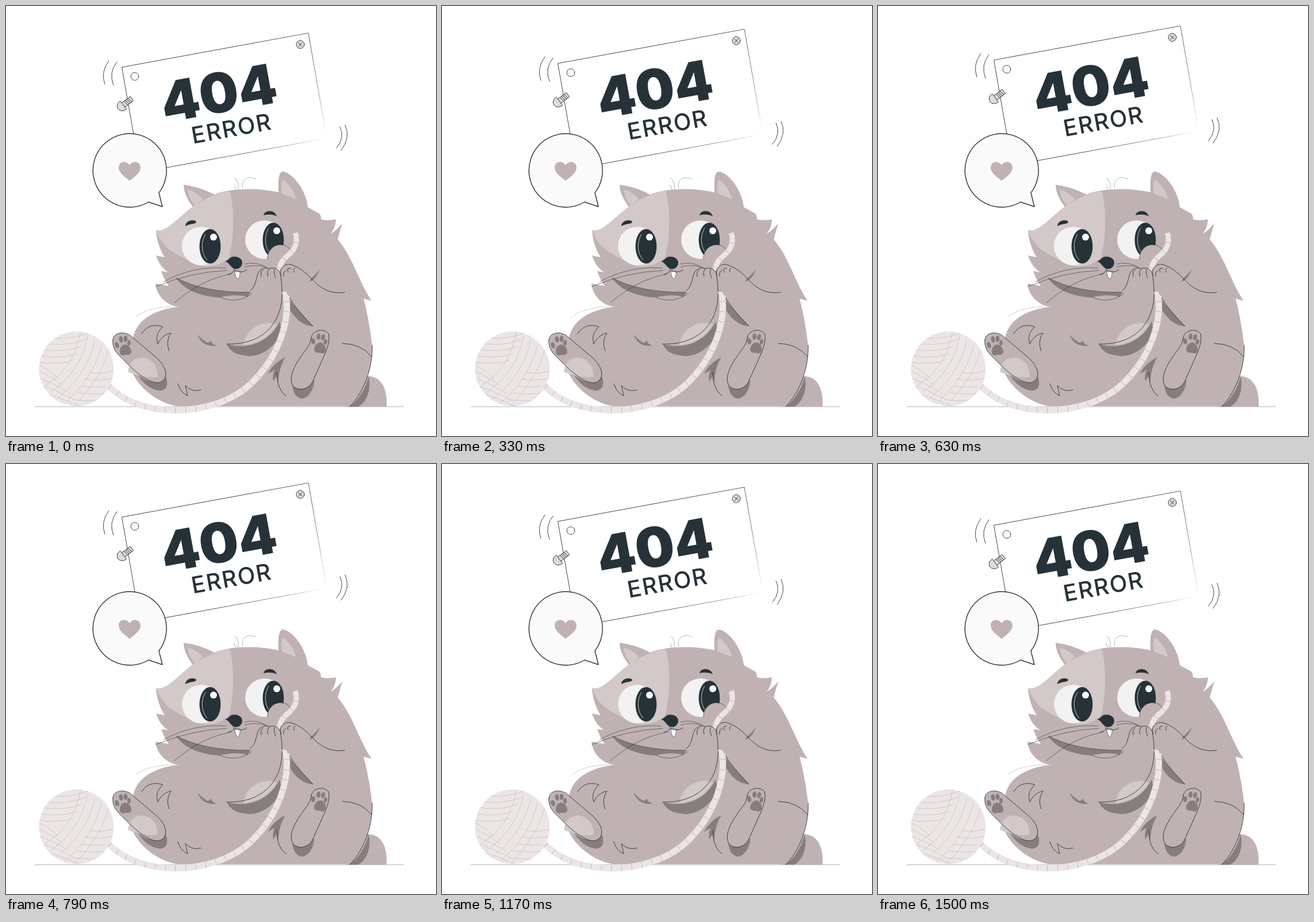
Write an HTML page that moves like this. It is 748x748 px and loops after 1.54 s.

```html
<!DOCTYPE html>
<html lang="en">
<head>
<meta charset="utf-8">
<title>404 error</title>
<style>
  html, body { margin: 0; height: 100%; overflow: hidden; background: #fff; }
  svg { display: block; width: 100vw; height: 100vh; }
  .fur { fill: #c0b2b3; }
  .light { fill: #d2c9c8; }
  .shade { fill: #867d7d; }
  .ink { fill: #263238; }
  .line { fill: none; stroke: #263238; stroke-width: .9; stroke-linecap: round; stroke-linejoin: round; }
  .thin { stroke-width: .6; }
  .yarn { fill: none; stroke: #ebe6e5; stroke-width: 11; }
  .ticks { fill: none; stroke: #b9afaf; stroke-width: 10; stroke-dasharray: .8 17; }
  .strand { fill: none; stroke: #cbc2c2; stroke-width: .9; }
  text { font-family: Inter, sans-serif; text-anchor: middle; fill: #263238; }
</style>
</head>
<body>
<svg viewBox="0 0 748 748">
  <defs>
    <radialGradient id="fade" gradientUnits="userSpaceOnUse" cx="558" cy="230" r="230">
      <stop offset=".02" stop-color="#263238" stop-opacity="0"/>
      <stop offset=".35" stop-color="#263238" stop-opacity=".55"/>
      <stop offset="1" stop-color="#263238"/>
    </radialGradient>
    <clipPath id="ballClip"><circle cx="122.5" cy="631" r="65"/></clipPath>
    <clipPath id="footClip"><path id="footL" d="M186 581C187 567 206 566 216 573L262 612C281 629 283 650 267 655C250 658 229 641 195 606C188 598 185 590 186 581Z"/></clipPath>
  </defs>

  <g id="sign">
    <path d="M201.5 106.5L526 47L558 230L233.5 289.5Z" fill="#fff" stroke="url(#fade)" stroke-width=".9"/>
    <text transform="translate(376 185) rotate(-10.3)" font-size="96" font-weight="900">404</text>
    <text transform="translate(395 227) rotate(-10.3)" font-size="40" font-weight="500" letter-spacing="1.8">ERROR</text>
    <circle class="line" cx="224" cy="122.5" r="6.8"/>
    <circle class="line" cx="512" cy="67" r="7" style="fill:#dcdcdc"/>
    <path class="line" d="M508.5 64L515.5 70M515 63.5L509 70.5"/>
    <g class="line" transform="translate(203 173) rotate(-37)" style="fill:#dcdcdc">
      <path d="M0-4.5H20V4.5H0ZM6-4.5L7.5 4.5M9-4.5L10.5 4.5M12-4.5L13.5 4.5M15-4.5L16.5 4.5"/>
      <path d="M1-9C-7-9-10-4-10 0S-7 9 1 9Z"/>
    </g>
    <path class="line" d="M179 95Q164 115 172 136M193 97Q178 116 187 138M581 210Q590 229 575 247M590 207Q600 229 583 251"/>
  </g>

  <path class="line" d="M248 341A64 64 0 1 1 266 325L272 349Z" style="fill:#fafafa;stroke-width:1.4"/>
  <path class="fur" d="M215 304C208 298 196 291 196 281C196 270 210 268 215 277C220 268 234 270 234 281C234 291 222 298 215 304Z"/>

  <path class="line thin" d="M50 697H692" opacity=".65"/>

  <!-- tail and body -->
  <path class="fur" d="M590 697H662C664 668 654 643 628 644Z"/>
  <path class="shade" d="M597 697C614 686 626 664 631 644C636 668 627 689 613 697Z"/>
  <path class="fur" d="M300 523C255 529 222 548 220 586L217 630C227 662 262 690 297 696H598C619 675 639 630 637 592C634 565 629 535 622 509L636 513C613 478 604 438 577 406L585 378Q574 391 565 396Q574 384 574 371Q559 374 548 371Q548 364 545 361L525 350L330 400Z"/>
  <path class="line" d="M637 590C638 635 620 674 598 697M585 587Q617 587 636 610"/>
  <path class="line thin" d="M226 541C240 528 265 524 290 523" opacity=".4"/>

  <!-- head -->
  <path class="fur" d="M261 390C278 394 292 375 325 349C316 338 309 324 309 311C328 313 348 320 362 328C390 316 440 316 474 324C473 305 474 289 481 288C498 289 522 320 525 350C560 400 550 450 500 470L430 499C410 517 388 514 372 507L297 523C280 520 262 505 260 483L283 487C277 479 273 470 270 461L282 463C273 457 266 449 261 434L276 437C268 425 262 408 261 390Z"/>
  <path class="light" d="M261 390C278 394 292 375 325 349Q355 328 389 321C398 355 397 402 388 438C370 454 348 457 325 448C300 430 276 430 261 390Z"/>
  <path class="light" d="M316 319C317 330 323 342 329 347L342 336C335 327 325 321 316 319ZM481 302C478 315 479 324 481 327Q494 331 505 336C501 322 492 308 481 302Z"/>
  <path class="line thin" d="M398 299Q406 306 404 318M435 301C418 293 408 305 412 317M397 311Q399 315 399 319" opacity=".6"/>
  <path class="shade" d="M296 473Q345 499 425 498L420 506Q400 500 372 507C342 506 310 495 296 473Z"/>
  <path class="line thin" d="M296 473Q345 499 425 498M372 507Q405 520 432 497"/>

  <!-- eyes -->
  <g id="eyes">
    <ellipse cx="340" cy="417.500" rx="34" ry="33.500" fill="#f2f2f2"/>
    <g class="ink"><ellipse cx="355" cy="418" rx="18.500" ry="30"/></g>
    <path d="M347 397C339 410 339 430 350 442" fill="none" stroke="#eee" stroke-width=".8"/>
    <circle cx="361" cy="402" r="6" fill="#fff"/>
  </g>
  <use href="#eyes" x="110" y="-11"/>
  <path class="ink" d="M312 383C312 374 325 370 331 375C331 380 320 378 312 383ZM448 364C450 354 468 354 471 366C465 362 455 362 448 364Z"/>

  <!-- muzzle -->
  <path class="ink" d="M381 444C388 443 388 436 397 436C405 436 411 440 411 447C410 456 402 459 397 457C391 455 388 446 381 444Z"/>
  <path class="line thin" d="M398 462Q399 472 403 475Q408 472 407 461Z" style="fill:#fff"/>
  <path class="line" d="M397 457Q398 464 386 467M398 460Q410 466 419 459"/>
  <path class="line thin" d="M382 456C340 452 300 465 274 480M384 460Q320 463 261 488M392 466C350 475 325 490 293 516M415 449Q436 443 455 456M415 454Q433 449 451 454"/>

  <!-- yarn ball -->
  <circle cx="122.500" cy="631" r="65" fill="#ebe6e5"/>
  <g id="strands" class="strand" clip-path="url(#ballClip)"></g>

  <!-- belly details -->
  <path class="line" d="M236 570C245 556 258 553 273 558C262 568 261 578 264 588C270 575 280 570 287 569C280 580 280 590 284 600M299 657C302 668 308 674 316 678C314 669 313 664 312 660C318 667 327 671 339 668"/>
  <path class="shade" d="M333 571C338 586 350 593 366 591Q358 588 356 582Q354 585 351 586C343 582 338 577 333 571Z"/>
  <path class="shade" d="M546 457C542 471 532 482 521 480C531 475 540 467 546 457Z"/>
  <path class="shade" d="M486 611C470 619 461 629 456 640L467 633Q463 643 465 653L472 642Q471 649 474 655C474 638 478 624 486 611Z"/>
  <path class="line" d="M471 637C471 657 477 671 487 678"/>

  <!-- arms -->
  <path class="shade" d="M384 588C415 597 455 590 476 549L480 568C463 600 440 609 422 609C402 607 390 602 384 588Z"/>
  <path class="fur" d="M400 535L480 490Q483 545 451 574Q420 592 384 588Z"/>
  <path class="light" d="M413 590C416 563 444 544 471 554C461 574 440 587 413 590Z"/>
  <path class="line" d="M480 494C483 545 452 590 384 588"/>
  <path class="shade" d="M486 501C499 521 520 541 534 557C512 556 498 538 489 519Z"/>
  <path class="line" d="M480 470C484 505 510 532 534 557"/>

  <!-- thread -->
  <path class="fur" d="M455 446C450 422 478 402 497 427L494 455Z"/>
  <path class="line thin" d="M455 440C453 418 482 403 497 427"/>
  <g id="thread">
    <path d="M503 394C509 412 502 425 489 435Q476 445 474 464" style="stroke-width:9"/>
    <path d="M486 496C496 545 476 609 425 658C382 697 320 705 285 703C245 701 205 690 176 658"/>
  </g>

  <!-- paws -->
  <path class="fur" d="M437 480C437 462 449 453 459 457C469 452 478 460 478 472L481 500L425 500ZM475 470C474 454 487 447 496 450C510 453 523 462 530 476L508 510L490 503Z"/>
  <path class="line" d="M425 495C437 488 434 465 443 459C449 455 454 455 458 457C468 453 478 460 478 470Q480 482 480 496M478 470C474 455 487 447 496 450C512 455 524 466 534 477C552 496 570 501 589 498"/>
  <path class="line" d="M447 459Q442 463 444 471M458 457Q453 463 456 470M467 458Q465 465 469 473M483 470Q481 463 487 460M491 463Q487 456 495 456M501 463Q499 457 503 456"/>

  <!-- feet -->
  <path class="shade" d="M230 642C247 656 264 658 278 644C284 660 278 669 268 669C252 668 237 655 230 642Z"/>
  <use href="#footL" class="fur"/>
  <ellipse class="light" cx="238" cy="639" rx="25" ry="28" transform="rotate(-25 238 639)" clip-path="url(#footClip)"/>
  <use href="#footL" class="line"/>
  <path class="shade" d="M498 656C505 672 525 670 536 650C537 664 527 682 515 683C505 682 498 672 498 656Z"/>
  <path class="fur line" style="fill:#c0b2b3" d="M531 577C533 563 553 560 561 570C564 580 560 592 555 605L533 654C525 670 500 671 497 655C493 640 505 620 520 600C528 590 530 584 531 577Z"/>
  <g id="pads" class="shade">
    <path d="M198 603C197 595 202 588 208 589C214 590 219 597 218 603C215 609 211 606 207 607C203 609 199 607 198 603Z"/>
    <ellipse cx="193" cy="590" rx="3.500" ry="5.500" transform="rotate(-20 193 590)"/>
    <ellipse cx="200" cy="580" rx="3.500" ry="5.500" transform="rotate(-10 200 580)"/>
    <ellipse cx="208" cy="579" rx="3.300" ry="5.500"/>
    <ellipse cx="214" cy="586" rx="3" ry="5"/>
  </g>
  <use href="#pads" transform="translate(546 586) rotate(14) translate(-205 -590)"/>
</svg>
<script>
  const LOOP = 1540, STEP = 1000 / 24, LAST = 36, RISE = 14.96;
  const $ = id => document.getElementById(id);
  const add = (parent, d, cls) => {
    const path = document.createElementNS('http://www.w3.org/2000/svg', 'path');
    path.setAttribute('d', d);
    if (cls) path.setAttribute('class', cls);
    parent.append(path);
  };

  // Thread with evenly spaced cross marks
  for (const path of [...$('thread').children]) {
    path.setAttribute('class', 'yarn');
    add($('thread'), path.getAttribute('d'), 'ticks');
  }

  // Wound strands of the ball, in four bands
  for (let k = 0; k < 5; k++) {
    const s = k * 12;
    add($('strands'), `M55 ${572 + s}Q98 ${586 + s * .8} ${146 - s * .6} ${568 + s}`);
    add($('strands'), `M${130 + s} ${565 + s * .7}Q${118 + s} ${632 + s * .4} ${68 + s * .8} ${660 + s}`);
    add($('strands'), `M54 ${622 + s}Q${78 + s * .4} ${634 + s} ${91 + s * .8} ${649 + s}`);
    add($('strands'), `M${145 - s * .6} ${637 + s}Q165 ${642 + s} 190 ${634 + s}`);
  }

  function draw(now) {
    const frame = Math.floor((now % LOOP + 4) / STEP);
    const phase = Math.min(frame, LAST) / LAST;
    const lift = RISE * (1 - Math.abs(1 - 2 * phase));
    $('sign').setAttribute('transform', `translate(0 ${-lift})`);
    requestAnimationFrame(draw);
  }
  draw(0);
</script>
</body>
</html>
```
